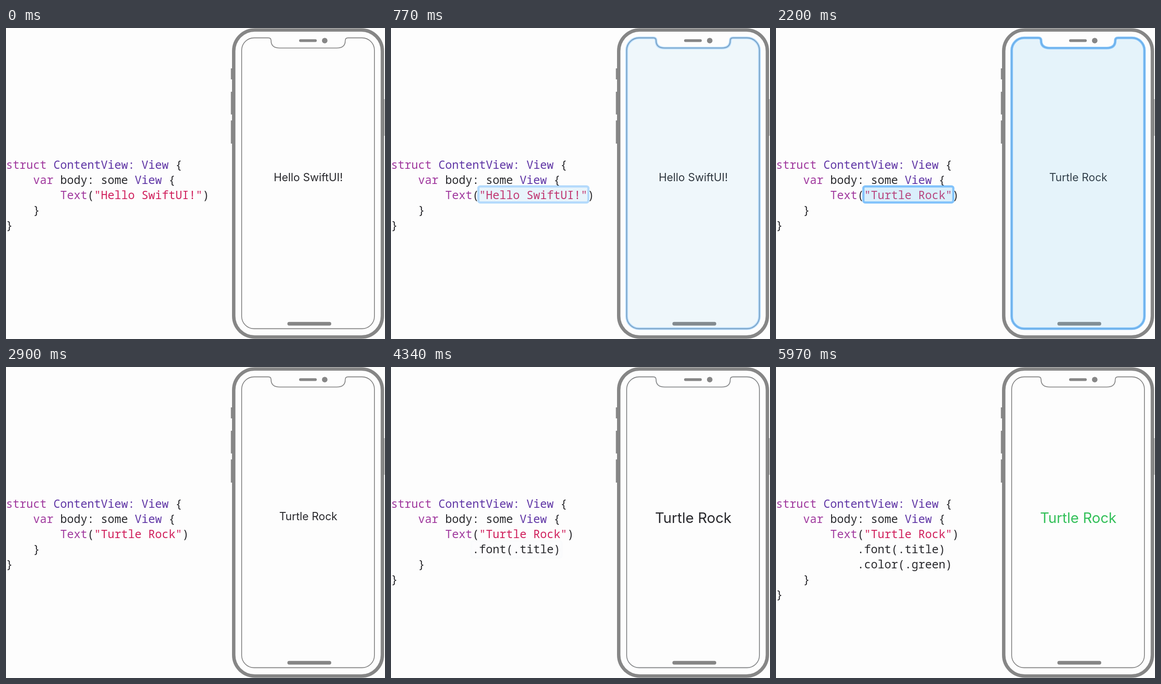
Recreate the animation shown at these times as an HTML page. Size 825x678 px, loop 6000 ms.

```html
<!DOCTYPE html>
<html lang="en">
<head>
<meta charset="utf-8">
<title>Live code preview</title>
<style>
  html, body { margin: 0; width: 100%; height: 100%; overflow: hidden; background: #fdfdfd; }
  svg { display: block; width: 825px; height: 678px; }
  text { white-space: pre; }
  #code text { font: 24.58px "Noto Sans Mono", "DejaVu Sans Mono", monospace; fill: #29292d; }
  #code .key { fill: #a0399e; }
  #code .type { fill: #5f35a5; }
  #code .str { fill: #d0205c; }
  #label { font-family: Inter, Roboto, sans-serif; text-anchor: middle; }
  .body { fill: none; stroke: #868686; }
  .solid { fill: #868686; }
  #glow { fill: #6cc0f0; stroke: #64b5fb; }
</style>
</head>
<body>
<svg viewBox="0 0 825 678">
  <defs>
    <path id="screen" d="M540 21.5H571Q577 21.5 577 27.5Q577 43.7 596 43.7H720Q738.5 43.7 738.5 27.5Q738.5 21.5 744.5 21.5H775A27 27 0 0 1 802 48.5V628.5A27 27 0 0 1 775 655.5H540A27 27 0 0 1 513 628.5V48.5A27 27 0 0 1 540 21.5Z"/>
  </defs>

  <g class="solid">
    <rect x="489.5" y="88" width="6" height="24"/>
    <rect x="489.5" y="139" width="6" height="49.5"/>
    <rect x="489.5" y="201.5" width="6" height="50.5"/>
    <rect x="819" y="155" width="5" height="80"/>
    <rect x="638" y="24.5" width="38.5" height="6" rx="3"/>
    <circle cx="693.8" cy="27.5" r="6"/>
    <rect x="612.5" y="640.7" width="95.5" height="8" rx="4"/>
  </g>
  <rect class="body" x="495.7" y="4.2" width="323.6" height="669.6" rx="46" stroke-width="7.4"/>
  <use class="body" href="#screen" stroke-width="1.8"/>

  <g id="code">
    <text x="0" y="306.5"><tspan class="key">struct</tspan> <tspan class="type">ContentView: View</tspan> {</text>
    <text x="0" y="339.5">    <tspan class="key">var</tspan> body: some <tspan class="type">View</tspan> {</text>
    <text x="0" y="372.5">        <tspan class="key">Text</tspan>(<tspan class="str" id="string"></tspan>)</text>
    <text x="0" y="405.5" id="font">            .font(.title)</text>
    <text x="0" y="438.5" id="color">            .color(.green)</text>
    <g id="braces">
      <text x="0" y="405.5">    }</text>
      <text x="0" y="438.5">}</text>
    </g>
  </g>
  <text id="label" x="658"></text>

  <g id="glow">
    <use href="#screen" fill-opacity=".2" stroke-width="5.6"/>
    <rect id="box" height="35" rx="4" fill-opacity=".3" stroke-width="4.8"/>
  </g>
</svg>

<script>
const LOOP = 6000;
const el = id => document.getElementById(id);

// Each state holds from `at` until the next one; box is [x, y, width].
const states = [
  { at: 0,    words: 'Hello SwiftUI!', lines: 0, box: [190.2, 345.3, 239.5] },
  { at: 1500, words: 'Turtle Rock',    lines: 0, box: [190.2, 345.3, 195.8] },
  { at: 3000, words: 'Turtle Rock',    lines: 1, box: [174.7, 380.2, 197] },
  { at: 4500, words: 'Turtle Rock',    lines: 2, box: [172.7, 413.2, 215] }
];

// Highlight pulses: start of rise, full, start of fall, gone.
const pulses = [
  [560, 1000, 2080, 2500],
  [3000, 3420, 3950, 4370],
  [4500, 4900, 5280, 5700]
];

const ease = x => {
  const p = Math.min(1, Math.max(0, x));
  return p * p * (3 - 2 * p);
};
const pulse = (t, [a, b, c, d]) => ease((t - a) / (b - a)) * (1 - ease((t - c) / (d - c)));

let shown;
function show(state) {
  if (state === shown) return;
  shown = state;
  const { words, lines, box: [x, y, width] } = state;
  el('string').textContent = `"${words}"`;
  el('font').style.display = lines > 0 ? '' : 'none';
  el('color').style.display = lines > 1 ? '' : 'none';
  el('braces').setAttribute('transform', `translate(0 ${33 * lines})`);

  const label = el('label');
  label.textContent = words;
  label.style.fontSize = lines ? '31.2px' : '23.7px';
  label.style.fill = lines > 1 ? '#34c05a' : '#29292d';
  label.setAttribute('y', lines ? 339.5 : 334);

  const box = el('box');
  box.setAttribute('x', x);
  box.setAttribute('y', y);
  box.setAttribute('width', width);
}

function draw() {
  const t = performance.now() % LOOP;
  show(states.findLast(s => s.at <= t));
  el('glow').setAttribute('opacity', Math.max(...pulses.map(p => pulse(t, p))));
  requestAnimationFrame(draw);
}
draw();
</script>
</body>
</html>
```
